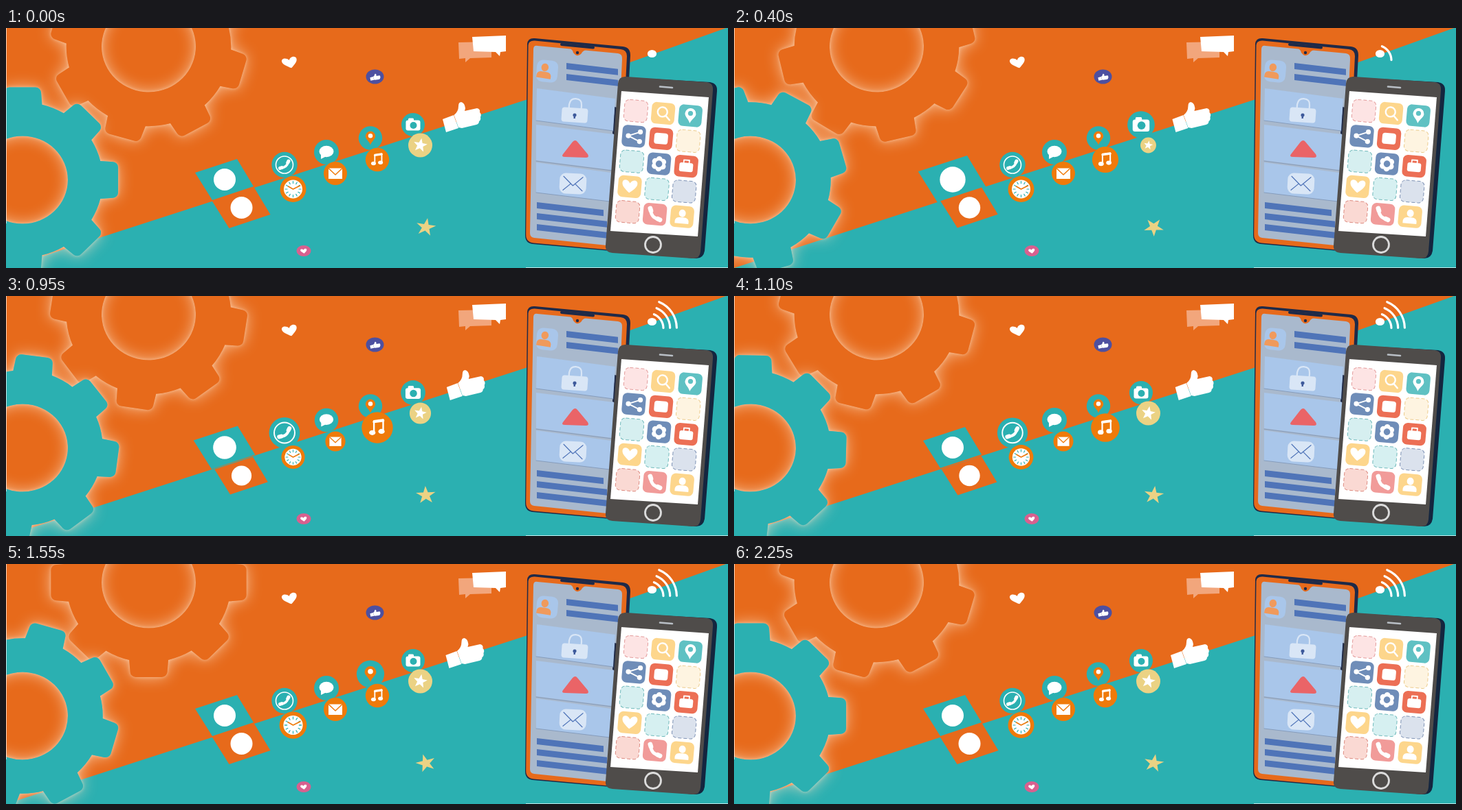
An HTML page with a canvas for the animation above (2300 ms loop, 1050x350 px).

```html
<!DOCTYPE html>
<html lang="en">
<head>
<meta charset="utf-8">
<title>Mobile apps</title>
<style>
html, body { margin: 0; width: 100%; height: 100%; overflow: hidden; }
canvas { display: block; }
</style>
</head>
<body>
<canvas id="stage" width="1050" height="350"></canvas>
<script>
const c = document.getElementById('stage').getContext('2d');
const LOOP = 2300, STEP = 50;
const ORANGE = '#e76a1b', TEAL = '#2bb0b1', DISC = '#ef7a0a', SAND = '#ebd284', WHITE = '#fff';
const SKY = '#a9c6ea', PALE = '#d9e6f6', BAR = '#4f74b8', NAVY = '#1f2a48';
const YELLOW = '#fdd68c', RED = '#ec6f55', BLUE = '#6f8db8';

function fill(color, d) {
  c.fillStyle = color;
  c.fill(new Path2D(d));
}

function line(color, width, d) {
  c.strokeStyle = color;
  c.lineWidth = width;
  c.lineCap = c.lineJoin = 'round';
  c.stroke(new Path2D(d));
}

function oval(color, x, y, rx, ry = rx) {
  c.fillStyle = color;
  c.beginPath();
  c.ellipse(x, y, rx, ry, 0, 0, 7);
  c.fill();
}

function box(color, x, y, w, h, r = 0) {
  c.fillStyle = color;
  c.beginPath();
  c.roundRect(x, y, w, h, r);
  c.fill();
}

function at(x, y, draw, scale = 1, degrees = 0, squash = 1) {
  c.save();
  c.translate(x, y);
  c.scale(scale, scale * squash);
  c.rotate(degrees * Math.PI / 180);
  draw();
  c.restore();
}

// Swells (or shrinks) by amp between two times
function pulse(t, from, to, amp) {
  return t > from && t < to ? 1 + amp * Math.sin(Math.PI * (t - from) / (to - from)) : 1;
}

// Small pictograms around the origin
const HEART = 'M0,9C-6,4 -11,0 -11,-5C-11,-11 -3,-11 0,-5C3,-11 11,-11 11,-5C11,0 6,4 0,9Z';
const PIN = 'M0,11C-2,5 -8,2 -8,-3A8,8 0 0 1 8,-3C8,2 2,5 0,11Z';
const TILE = 'M-43,-10L18,-30L42,10L-18,30Z';

function star(color, r, inner = 0.42) {
  c.fillStyle = color;
  c.beginPath();
  for (let i = 0; i < 10; i++) {
    const a = i * Math.PI / 5 - Math.PI / 2, k = i % 2 ? r * inner : r;
    c.lineTo(k * Math.cos(a), k * Math.sin(a));
  }
  c.closePath();
  c.fill();
}

function pin(color, dot) {
  fill(color, PIN);
  oval(dot, 0, -3.5, 3.6);
}

function handset() {
  line(WHITE, 3.4, 'M-5,-5Q-4,4 5,5');
  line(WHITE, 5, 'M-5.5,-6L-4.5,-3.5M6,5.5L3.5,4.5');
}

function person(color) {
  oval(color, 0, -5, 5, 5.5);
  fill(color, 'M-10,10V6Q-9,1 -3,1H3Q9,1 10,6V10Z');
}

function thumb() {
  fill(WHITE, 'M-28,3L-12,-3L-5,16L-23,22Z');
  fill(WHITE, 'M-11.5,-3Q-5,-8 -5,-16Q-5,-22 -1,-22Q4,-21 5,-13L4,-9L22,-13Q27,-12 26,-7Q29,-4 27,0Q28,4 25,6Q25,10 21,11L0,16L-5,15Z');
}

function gear(x, y, body, tip, hole, degrees, color) {
  const base = Math.sqrt(body * body - 28 * 28), half = Math.asin(28 / body);
  c.save();
  c.translate(x, y);
  c.scale(1.015, 0.985);
  c.rotate(degrees * Math.PI / 180);
  c.beginPath();
  for (let i = 0; i < 8; i++) {
    c.lineTo(base, -28);
    c.arcTo(tip, -26, tip, 26, 8);
    c.arcTo(tip, 26, base, 28, 8);
    c.lineTo(base, 28);
    c.arc(0, 0, body, half, Math.PI / 4 - half);
    c.rotate(Math.PI / 4);
  }
  c.closePath();
  c.moveTo(hole, 0);
  c.arc(0, 0, hole, 0, 2 * Math.PI);
  c.fillStyle = color;
  // A wide soft glow, then a tight bright rim
  c.shadowColor = '#ffe2c8b0';
  c.shadowBlur = 22;
  c.fill('evenodd');
  c.shadowColor = '#ffe2c890';
  c.shadowBlur = 5;
  c.fill('evenodd');
  c.restore();
}

function background() {
  box(ORANGE, 0, 0, 1050, 350);
  fill(TEAL, 'M0,350L757,104.5L905,51L1050,-1V350Z');
}

function decorations(t, swing) {
  at(413, 51, () => fill(WHITE, HEART), 1, -14, 0.84);
  oval('#4d50a0', 536.5, 71, 13, 10.5);
  at(537, 72, thumb, 0.27, 5, 0.9);
  oval('#d8608f', 433, 325, 10.5, 8);
  at(433, 325.5, () => fill(WHITE, HEART), 0.42, -8, 0.84);
  fill('#f2a67c', 'M658,21L706,20V43L675,44L668,50V44L659,45Z');
  fill(WHITE, 'M678,13L727,11L727,34L719,35L718,41L712,35L680,34Z');
  at(610.5, 290.5, () => star(SAND, 15, 0.38), 1, 10 + 72 * swing, 0.9);
  at(663 + 7 * swing, 130, thumb);

  oval(WHITE, 939.5, 37.5, 6.6, 5.6);
  c.strokeStyle = WHITE;
  c.lineWidth = 3.2;
  c.lineCap = 'round';
  for (let i = 0; i < 3 && t >= 250 * (i + 1); i++) {
    c.beginPath();
    c.arc(934, 47, 22 + 9.7 * i, -1.18, -0.02);
    c.stroke();
  }
}

function badges(t) {
  const plain = color => () => { fill(color, TILE); oval(WHITE, 0, 0, 16); };
  at(318, 221, plain(TEAL), pulse(t, 0, 1050, 0.18));
  at(342.5, 262, plain(ORANGE), pulse(t, 350, 1250, -0.1));

  const badge = (x, y, r, color, scale, draw) =>
    at(x, y, () => { oval(color, 0, 0, r); draw(); }, scale);

  badge(405, 199.5, 18.7, TEAL, pulse(t, 500, 1450, 0.2), () => {
    line(WHITE, 1.6, 'M12.5,0A12.5,12.5 0 1 1 -12.5,0A12.5,12.5 0 1 1 12.5,0');
    at(0, 0, handset, 1, -85);
  });
  badge(417.5, 235, 19, DISC, pulse(t, 700, 1200, -0.1) * pulse(t, 1200, 1750, 0.05), () => {
    oval(WHITE, 0, 0, 13.5);
    for (let i = 0; i < 12; i++) at(0, 0, () => line(TEAL, 1.2, 'M0,-11.5V-8.5'), 1, i * 30);
    line(DISC, 1.6, 'M-7,-4L0,0L10,-5');
  });
  badge(466, 181, 18, TEAL, pulse(t, 550, 1100, -0.05), () => {
    oval(WHITE, 0, -1, 10.5, 8.2);
    fill(WHITE, 'M-8,3L-8,10L0,6Z');
  });
  badge(479, 212, 17, DISC, pulse(t, 600, 1500, -0.15), () => {
    box(WHITE, -10, -7.5, 20, 15.5);
    line(DISC, 1.5, 'M-9.5,-7L0,2L9.5,-7');
  });
  badge(530, 160.5, 17.2, TEAL, pulse(t, 1150, 2000, 0.17), () =>
    at(0, 0, () => pin(DISC, WHITE), 0.9));
  badge(540, 192, 17.2, DISC, pulse(t, 300, 1300, 0.36), () => at(0, 0, () => {
    line(WHITE, 2, 'M-4,5V-8L7,-9.5V4');
    line(WHITE, 3, 'M-4,-7L7,-8.5');
    oval(WHITE, -6, 6, 3.8, 3);
    oval(WHITE, 5, 4.5, 3.8, 3);
  }, 0.92));
  badge(592, 141, 17, TEAL, pulse(t, 0, 1050, 0.18), () => {
    box(WHITE, -10.5, -6.5, 21, 15, 3);
    box(WHITE, -7, -9.5, 8, 5, 1.5);
    oval(TEAL, 0.5, 1, 5);
  });
  badge(602.5, 171, 17.5, SAND, pulse(t, 0, 1050, -0.37), () =>
    at(0, 0, () => star(WHITE, 10.5), 1, 10));
}

function backPhone() {
  fill(NAVY, 'M758,23Q759,14 769,15L897,27Q908,28 908,40L893,312Q892,326 879,325L766,315Q755,314 755,302Z');
  fill(ORANGE, 'M759.5,25Q760,18 769,18.5L894,31Q903,32 903,41L890,310Q889,325 877,323.5L767,313.5Q756,312 756.2,301Z');
  fill('#a9b9cd', 'M767,31Q767,25 773,26L890,37Q897,38 896,46L884,308Q884,319 874,317L768,306Q762,305 762,299Z');
  line(NAVY, 4, 'M808,24L854,28.5');
  fill(ORANGE, 'M821,30L843,32Q838,34 837,37Q831,44 825,36Q824,32 821,30Z');
  oval(NAVY, 831, 36, 2.2);
  fill(NAVY, 'M885,115L889,116L886,156L882,154Z');

  at(787, 63, () => {
    box(SKY, -15.5, -16, 31, 32, 9);
    at(-4, 0, () => person('#f09a5c'), 1.05, 4);
  }, 1, 5);
  const bar = (x, y, w, h = 9) =>
    fill(BAR, `M${x},${y}l${w},${w * 0.115}v${h}l${-w},${-w * 0.115}Z`);
  bar(815, 51, 75);
  bar(815, 67, 75);
  bar(772, 254, 97);
  bar(772, 270, 102);
  bar(772, 286, 102);

  fill(SKY, 'M772,88L886,103L883,150L771,135Z');
  fill(SKY, 'M771,141L884,155L881,207L771,193Z');
  fill(SKY, 'M771,196L880,211L878,253L771,240Z');
  line('#7d93b4', 0.8, 'M771,135L883,150M771,194L881,208M771,240L878,253');

  at(827, 127, () => {
    line(PALE, 2.2, 'M-9,-9V-15Q-8,-24 0,-24Q9,-24 9,-15V-9');
    box(PALE, -19, -10.5, 38, 21, 4);
    oval('#3e5a9b', 0, 0, 2.6);
    box('#3e5a9b', -1.2, 0, 2.4, 5);
  }, 1, 4);
  fill('#ea6467', 'M810,184L824,166Q828,162 831,166L846,184Q849,189 843,189L813,188Q807,188 810,184Z');
  at(824.5, 227, () => {
    box(PALE, -19.5, -15, 39, 30, 9);
    line(BAR, 1.2, 'M-14,-10L0,3L14,-10M-14,10L-3,0M14,10L3,0');
  }, 1, 3);
}

// App icons, row by row: colour, then a dash colour or a pictogram
const apps = [
  ['#fde4e4', '#e39a9a'],
  [YELLOW, () => line(WHITE, 2.4, 'M6,-2A7,7 0 1 1 -8,-2A7,7 0 1 1 6,-2M4.5,3.5L10,9')],
  ['#5fc1c3', () => pin(WHITE, '#5fc1c3')],
  [BLUE, () => {
    line(WHITE, 2, 'M9,-7L-8,0L9,7');
    [[9, -7], [-8, 0], [9, 7]].forEach(([x, y]) => oval(WHITE, x, y, 3.6));
  }],
  [RED, () => box(WHITE, -10, -8, 20, 16, 4)],
  ['#fef4e1', '#eccb8c'],
  ['#d6eff0', '#6fb9bb'],
  [BLUE, () => {
    for (let i = 0; i < 6; i++) at(0, 0, () => oval(WHITE, 0, -6.5, 4.6), 1, i * 60);
    oval(BLUE, 0, 0, 4.8);
  }],
  [RED, () => {
    box(WHITE, -10, -5, 20, 13, 3);
    line(WHITE, 1.8, 'M-4,-5V-9H4V-5');
  }],
  [YELLOW, () => fill(WHITE, HEART)],
  ['#d6f0f1', '#6fb9bb'],
  ['#dbe2ed', '#7f93b5'],
  ['#fad9d3', '#dd8b80'],
  ['#f19b99', () => at(0, 0, handset, 1.35)],
  [YELLOW, () => person(WHITE)]
];

function frontPhone() {
  fill('#14263f', 'M900,72L1024,79Q1035,81 1034,92L1016,325Q1014,337 1002,336L890,326Z');
  fill('#4f4c4a', 'M890,81Q891,70 902,71L1019,79Q1029,80 1028,91L1010,326Q1009,337 998,336L882,328Q871,327 872,317Z');
  fill(WHITE, 'M895,92L1022,101L1006,304L879,296Z');
  line('#b9bfc6', 2.6, 'M951,85.5L969,87');
  line('#dcdcdc', 2.8, 'M952.5,316A11.5,11.5 0 1 1 929.5,316A11.5,11.5 0 1 1 952.5,316');

  apps.forEach(([color, extra], i) => {
    const col = i % 3, row = Math.floor(i / 3);
    at(916 + 39.6 * col - 3 * row, 121 + 3.5 * col + 36.8 * row, () => {
      box(color, -17, -15.8, 34, 31.6, 7);
      if (typeof extra === 'function') return extra();
      c.strokeStyle = extra;
      c.lineWidth = 1;
      c.lineCap = 'butt';
      c.setLineDash([5, 3]);
      c.stroke();
    }, 1, 5);
  });
}

function frame(now) {
  const t = Math.floor(now % LOOP / STEP) * STEP;
  // There and back again
  const swing = t < 1150 ? t / 1150 : (2250 - t) / 1100;

  background();
  gear(207.5, 27, 118, 140, 67.5, 16 + 45.5 * swing, ORANGE);
  gear(24, 221.5, 115, 137, 65, -45.5 * swing, TEAL);
  decorations(t, swing);
  badges(t);
  backPhone();
  frontPhone();
  box('#ffffffb0', 0, 0, 1, 285);
  box('#ffffffb0', 756, 349, 294, 1);
  requestAnimationFrame(loop);
}

const start = performance.now();
function loop() {
  frame(performance.now() - start);
}
loop();
</script>
</body>
</html>
```
